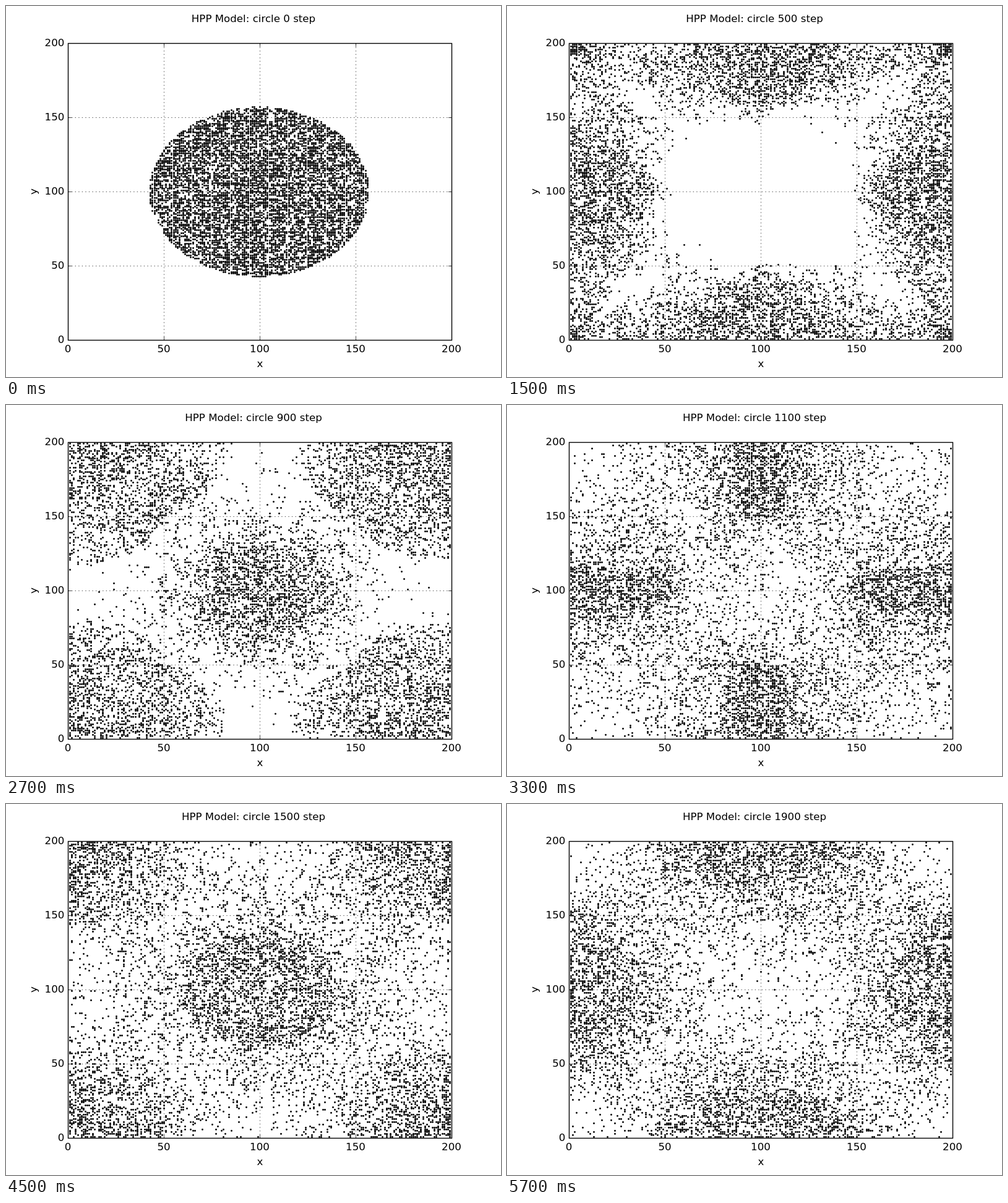
Write an HTML page with a canvas that moves like this. It is 800x600 px and loops after 6 s.

```html
<!DOCTYPE html>
<html>
<head>
<meta charset="utf-8">
<style>
  html, body { margin: 0; width: 100%; height: 100%; overflow: hidden; background: #fff; }
  canvas { display: block; }
</style>
</head>
<body>
<canvas id="stage" width="800" height="600"></canvas>
<script>
const ctx = document.getElementById('stage').getContext('2d');
const FRAMES = 20, FRAME_MS = 300, MOVES_PER_FRAME = 25, LABEL_STEP = 100;
const LAST = 199, W = LAST + 2;              // gas cells are 1..199, walls at 0 and 200
const RIGHT = 1, UP = 2, LEFT = 4, DOWN = 8;
const plotX = x => 100 + x * 3.1;
const plotY = y => 540 - y * 2.4;

let seed = 20231;
function random() {
  seed = (seed + 0x6D2B79F5) | 0;
  let t = Math.imul(seed ^ (seed >>> 15), 1 | seed);
  t = (t + Math.imul(t ^ (t >>> 7), 61 | t)) ^ t;
  return ((t ^ (t >>> 14)) >>> 0) / 4294967296;
}

function disc() {
  const cells = new Uint8Array(W * W);
  for (let y = 1; y <= LAST; y++)
    for (let x = 1; x <= LAST; x++)
      if (Math.hypot(x - 99.6, y - 100) <= 57.2)
        for (const dir of [RIGHT, UP, LEFT, DOWN])
          if (random() < 0.2) cells[y * W + x] |= dir;
  return cells;
}

// Head-on pairs turn by 90 degrees, then every particle moves one cell or bounces.
function advance(cells) {
  const next = new Uint8Array(W * W);
  for (let y = 1; y <= LAST; y++)
    for (let x = 1; x <= LAST; x++) {
      const i = y * W + x;
      let c = cells[i];
      if (c === (RIGHT | LEFT) || c === (UP | DOWN)) c ^= 15;
      if (c & RIGHT) { if (x < LAST) next[i + 1] |= RIGHT; else next[i] |= LEFT; }
      if (c & LEFT) { if (x > 1) next[i - 1] |= LEFT; else next[i] |= RIGHT; }
      if (c & UP) { if (y < LAST) next[i + W] |= UP; else next[i] |= DOWN; }
      if (c & DOWN) { if (y > 1) next[i - W] |= DOWN; else next[i] |= UP; }
    }
  return next;
}

const states = [disc()];
while (states.length < FRAMES) {
  let cells = states[states.length - 1];
  for (let i = 0; i < MOVES_PER_FRAME; i++) cells = advance(cells);
  states.push(cells);
}

const dot = document.createElement('canvas');
dot.width = dot.height = 3;
const dotCtx = dot.getContext('2d');
dotCtx.arc(1.5, 1.5, 1.45, 0, 7);
dotCtx.fill();

function line(x1, y1, x2, y2, width, dash = []) {
  ctx.lineWidth = width;
  ctx.setLineDash(dash);
  ctx.beginPath();
  ctx.moveTo(x1 + 0.5, y1 + 0.5);
  ctx.lineTo(x2 + 0.5, y2 + 0.5);
  ctx.stroke();
}

function text(str, x, y, align = 'center') {
  ctx.textAlign = align;
  ctx.fillText(str, x, y);
}

function draw(index) {
  ctx.fillStyle = '#fff';
  ctx.fillRect(0, 0, 800, 600);
  ctx.fillStyle = ctx.strokeStyle = '#000';
  ctx.font = '16.667px "DejaVu Sans", sans-serif';

  for (const v of [50, 100, 150]) {
    line(plotX(v), 540, plotX(v), 60, 0.69, [1.39, 4.17]);
    line(100, plotY(v), 720, plotY(v), 0.69, [1.39, 4.17]);
  }

  const cells = states[index];
  for (let y = 1; y <= LAST; y++)
    for (let x = 1; x <= LAST; x++)
      if (cells[y * W + x])
        ctx.drawImage(dot, Math.round(plotX(x)) - 1, Math.round(plotY(y)) - 1);

  for (let v = 0; v <= 200; v += 50) {
    const x = plotX(v), y = plotY(v);
    line(x, 540, x, 534.4, 0.69);
    line(x, 60, x, 65.6, 0.69);
    line(100, y, 105.6, y, 0.69);
    line(720, y, 714.4, y, 0.69);
    text(v, x, 560);
    text(v, 94.4, y + 5, 'right');
  }
  ctx.lineWidth = 1.39;
  ctx.setLineDash([]);
  ctx.strokeRect(100.5, 60.5, 620, 480);

  text(`HPP Model: circle ${index * LABEL_STEP} step`, 400, 26);
  text('x', 410.5, 584);
  ctx.save();
  ctx.translate(50, 300);
  ctx.rotate(-Math.PI / 2);
  text('y', 0, 0);
  ctx.restore();
}

let shown = -1;
function tick() {
  const index = Math.floor(performance.now() / FRAME_MS) % FRAMES;
  if (index !== shown) draw(shown = index);
  requestAnimationFrame(tick);
}
tick();
</script>
</body>
</html>
```
